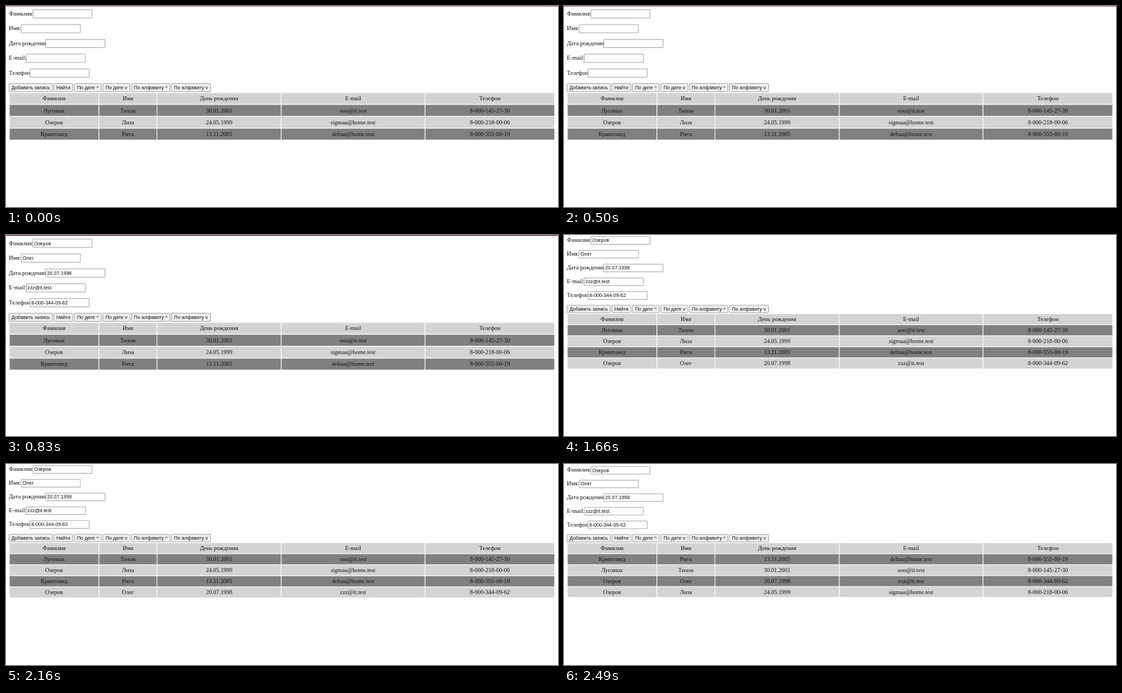
Animation of 800 by 292 pixels, one loop 3.32 s. Source, as an HTML page:

```html
<!DOCTYPE html>
<html lang="ru">
<head>
<meta charset="utf-8">
<style>
  html, body { margin: 0; width: 100%; height: 100%; overflow: hidden; background: #fff; }
  svg { display: block; }
  text { font: 8.53px "Liberation Serif", "Times New Roman", serif; fill: #111; }
  .mid { text-anchor: middle; }
  .ui { font: 7.11px "Liberation Sans", Arial, sans-serif; }
  .input { fill: #fff; stroke: #858585; stroke-width: .65; }
  .button { fill: #efefef; stroke: #858585; stroke-width: .65; }
  .scene { visibility: hidden; animation: show 3320ms step-end infinite; }
  @keyframes show {
    0% { visibility: visible; }
    25%, 100% { visibility: hidden; }
  }
</style>
</head>
<body>
<svg id="stage" width="800" height="292" viewBox="0 0 800 292"></svg>
<script>
const stage = document.getElementById('stage');

const fields = [['Фамилия:', 39], ['Имя:', 22], ['Дата рождения', 57.7], ['E-mail:', 29.2], ['Телефон', 34.8]];
const buttons = [
  ['Добавить запись', 4.3, 67.3], ['Найти', 69.3, 96.9], ['По дате ^', 99.2, 138],
  ['По дате v', 140.3, 179.7], ['По алфавиту ^', 182, 237.5], ['По алфавиту v', 239.6, 296.5]
];
const columns = [[5.3, 134.1], [135.2, 218.3], [219.3, 398.3], [399.4, 606.7], [607.8, 794.7]];
const header = ['Фамилия', 'Имя', 'День рождения', 'E-mail', 'Телефон'];
const people = [
  ['Луговых', 'Тихон', '30.01.2001', 'ooo@it.test', '8-000-145-27-30'],
  ['Озеров', 'Лиза', '24.05.1999', 'sigmaa@home.test', '8-000-218-00-06'],
  ['Кринтовед', 'Рита', '13.11.2005', 'deltaa@home.test', '8-000-555-00-19'],
  ['Озеров', 'Олег', '20.07.1998', 'zzz@it.test', '8-000-344-09-62']
];

// top: centre of the first label; scale: vertical scale of the page
const scenes = [
  { top: 11, scale: 1.075, order: [0, 1, 2], line: '#b9728c' },
  { top: 11.6, scale: 1.08, order: [0, 1, 2], line: '#6a1040', filled: true },
  { top: 7.5, scale: 1, order: [0, 1, 2, 3], filled: true },
  { top: 8.8, scale: .99, order: [2, 0, 3, 1], filled: true }
];

function add(parent, tag, attrs, content = '') {
  const el = document.createElementNS('http://www.w3.org/2000/svg', tag);
  for (const key in attrs) el.setAttribute(key, attrs[key]);
  el.textContent = content;
  return parent.appendChild(el);
}

function box(parent, left, right, middle, height, attrs) {
  add(parent, 'rect', { x: left, y: middle - height / 2, width: right - left, height, ...attrs });
}

function drawForm(page, filled) {
  fields.forEach(([label, x], i) => {
    const y = i * 20;
    add(page, 'text', { x: 4.3, y: y + 2.7 }, label);
    box(page, x, x + 85.8, y + .4, 11.2, { class: 'input', rx: .4 });
    if (filled) add(page, 'text', { x: x + 1.9, y: y + 2.8, class: 'ui' }, people[3][i]);
  });
  buttons.forEach(([label, left, right]) => {
    box(page, left, right, 100, 10.9, { class: 'button', rx: 1.2 });
    add(page, 'text', { x: (left + right) / 2, y: 102.3, class: 'ui mid' }, label);
  });
}

function drawTable(page, rows) {
  rows.forEach((cells, r) => {
    const y = 114.8 + r * 16.04;
    columns.forEach(([left, right], c) => {
      box(page, left, right, y, 14.97, { fill: r % 2 ? '#808080' : '#d3d3d3' });
      add(page, 'text', { x: (left + right) / 2, y: y + 2.7, class: 'mid' }, cells[c]);
    });
  });
}

scenes.forEach(({ top, scale, order, line, filled }, i) => {
  const scene = add(stage, 'g', { class: 'scene', style: `animation-delay:${i ? (i - 4) * 830 : 0}ms` });
  if (line) add(scene, 'rect', { width: 800, height: 1, fill: line });
  const page = add(scene, 'g', { transform: `translate(0 ${top}) scale(1 ${scale})` });
  drawForm(page, filled);
  drawTable(page, [header, ...order.map(n => people[n])]);
});
</script>
</body>
</html>
```
